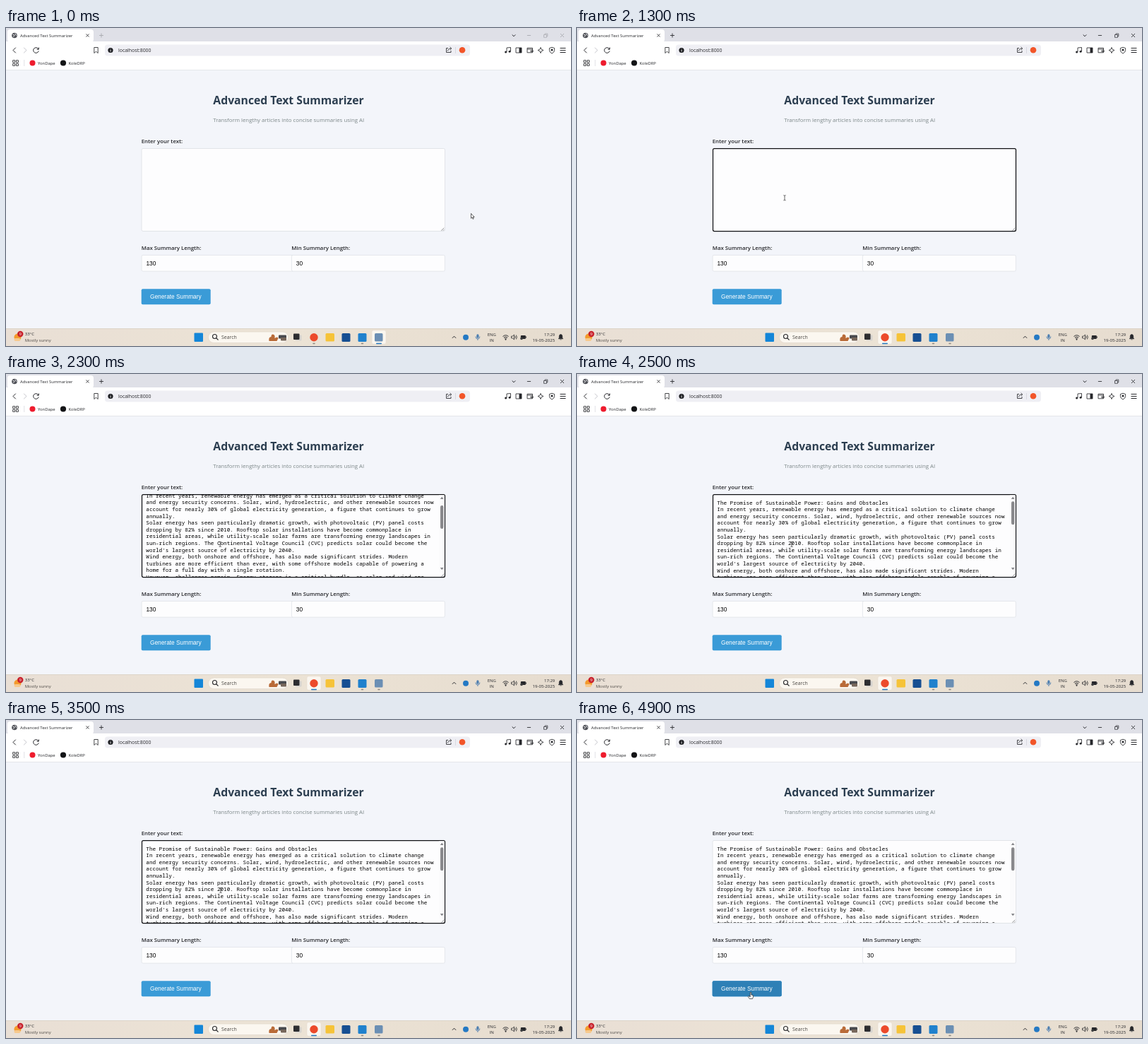
An HTML page with a canvas that plays this animation: 800 by 450 pixels, repeating every 5000 ms.

```html
<!DOCTYPE html>
<html lang="en">
<head>
<meta charset="utf-8">
<title>Advanced Text Summarizer</title>
<style>
html, body { margin: 0; width: 100%; height: 100%; overflow: hidden; }
canvas { display: block; width: 800px; height: 450px; }
</style>
</head>
<body>
<canvas id="stage"></canvas>
<script>
const LOOP = 5000, STEP = 100;
const FOCUS = 600, PASTE = 1500, SCROLL = [1900, 2400], CLICK = 4700;
const UI = '"Open Sans", "Noto Sans", sans-serif';
const ARIAL = '"Liberation Sans", sans-serif';
const MONO = '"Noto Sans Mono", "DejaVu Sans Mono", monospace';
const INK = '#26272b';

const article = `The Promise of Sustainable Power: Gains and Obstacles
In recent years, renewable energy has emerged as a critical solution to climate change
and energy security concerns. Solar, wind, hydroelectric, and other renewable sources now
account for nearly 30% of global electricity generation, a figure that continues to grow
annually.
Solar energy has seen particularly dramatic growth, with photovoltaic (PV) panel costs
dropping by 82% since 2010. Rooftop solar installations have become commonplace in
residential areas, while utility-scale solar farms are transforming energy landscapes in
sun-rich regions. The Continental Voltage Council (CVC) predicts solar could become the
world's largest source of electricity by 2040.
Wind energy, both onshore and offshore, has also made significant strides. Modern
turbines are more efficient than ever, with some offshore models capable of powering a
home for a full day with a single rotation.
However, challenges remain. Energy storage is a critical hurdle, as solar and wind are
intermittent sources. Battery technology is improving, but large-scale storage is still
expensive. Grid infrastructure also needs upgrades to handle distributed generation.
Supply chains for key minerals add further pressure on costs and delivery times.
Policy support plays a crucial role in the pace of this change.
Many governments offer incentives, but the playing field is uneven. Despite growing
subsidies for renewable energy, fossil fuels still receive significantly more in global
subsidies. The political will to maintain consistent renewable energy policies varies
greatly between nations.
Despite these challenges, experts remain optimistic. Technological advancements in areas
like perovskite solar cells, floating wind turbines, and green hydrogen production
continue to push the boundaries of what's possible. As costs decline further and
efficiencies improve, renewable energy appears poised to dominate the global energy mix
within the coming decades.
The transition to renewable energy isn't just about technology—it represents a
fundamental shift in how societies produce and consume energy. While the path forward has
obstacles, the environmental and economic benefits make this transition one of the most
important undertakings of the 21st century.`.split('\n');
const LINE = 9.583, BOTTOM = 186.7;

// time, x, y
const path = [
  [0, 658.5, 262.5], [100, 658.5, 262.5], [500, 294, 242], [1800, 294, 239.5],
  [2400, 304, 241], [3700, 304, 241], [4200, 240.5, 363.5], [4500, 246, 385.5], [LOOP, 246, 385.5]
];

const canvas = document.getElementById('stage');
const c = canvas.getContext('2d');
const dpr = window.devicePixelRatio || 1;
canvas.width = 800 * dpr;
canvas.height = 450 * dpr;

const smooth = (a, b, t) => {
  const k = Math.min(1, Math.max(0, (t - a) / (b - a)));
  return k * k * (3 - 2 * k);
};

function box(x, y, w, h, fill, r = 0, stroke, lw = 1) {
  c.beginPath();
  c.roundRect(x, y, w, h, r);
  if (fill) { c.fillStyle = fill; c.fill(); }
  if (stroke) { c.strokeStyle = stroke; c.lineWidth = lw; c.stroke(); }
}

function dot(x, y, r, fill) {
  c.beginPath();
  c.arc(x, y, r, 0, 7);
  c.fillStyle = fill;
  c.fill();
}

function text(s, x, y, size, color = INK, { family = UI, weight = 400, align = 'left' } = {}) {
  c.font = `${weight} ${size}px ${family}`;
  c.textAlign = align;
  c.fillStyle = color;
  c.fillText(s, x, y);
}

function icon(d, x, y, stroke = INK, fill, lw = 0.85) {
  const p = new Path2D(d);
  c.save();
  c.translate(x, y);
  if (fill) { c.fillStyle = fill; c.fill(p); }
  if (stroke) { c.strokeStyle = stroke; c.lineWidth = lw; c.stroke(p); }
  c.restore();
}

function browser(active) {
  const dim = active ? INK : '#a6a7ad';
  box(0, 0, 800, 19, '#dfe0e7');
  box(0, 19, 800, 40, '#fff');
  box(2, 2, 122, 18, '#fff', 4);
  dot(12, 10.5, 3.8, '#505259');
  icon('M-2.5-1.5L0-.5L-.5 1L-2 2M1-3L1.5-1L3 0', 12, 10.5, '#fff');
  text('Advanced Text Summarizer', 20, 12.6, 5.88);
  icon('M-2-2L2 2M2-2L-2 2', 115.5, 10.5);
  icon('M-3 0H3M0-3V3', 135, 10.5, dim);
  icon('M-2.3-1L0 1.3L2.3-1', 719, 10.5, INK, null, 1);
  icon('M-2.6 0H2.6', 740.5, 10.5, dim);
  icon('M-2.5-1H1.5V2.8H-2.5ZM-1-1V-2.5H2.8V1.3H1.5', 764, 10.5, dim, null, 0.7);
  icon('M-2.5-2.5L2.5 2.5M2.5-2.5L-2.5 2.5', 787.5, 10.5, dim);

  icon('M1.8-3.8L-2 0L1.8 3.8', 12, 31.5, INK, null, 1);
  icon('M-1.8-3.8L2 0L-1.8 3.8', 27, 31.5, '#b9bac0');
  icon('M3.5-1.5A3.8 3.8 0 1 0 3.7 1M3.8-4V-1.3H1.2', 42.5, 31.5, INK, null, 1);
  icon('M-2.7-4H2.7V4L0 1.7L-2.7 4Z', 127.5, 31.5);
  box(140, 23.5, 517, 16, '#efeff4', 4);
  dot(148, 31.5, 3.6, '#1d1e22');
  box(147.6, 31, 0.9, 2.4, '#fff');
  box(147.6, 29.4, 0.9, 0.9, '#fff');
  text('localhost:8000', 159, 33.9, 6.9);
  icon('M-1-2.5H-3.5V3.5H3V1M-1.5 1.5C-1.3-1 .5-2 3.5-2M1.6-4L3.7-2L1.6 0', 627, 31);
  box(636, 27, 0.7, 9, '#d0d0d7');
  dot(646, 31.3, 4.3, '#f25529');

  icon('M-2 2.3V-3.5L3.5-4V1.5', 711, 31.5);
  dot(707.6, 34, 1.5, INK);
  dot(713.1, 33.3, 1.5, INK);
  icon('M-4-3.5H4V3.5H-4Z', 726, 31.5);
  box(726.5, 28, 3.5, 7, INK);
  icon('M-4-3H3.5V3.5H-4ZM-4-1.3H3.5M1 .5H4.2V2.2H1Z', 742, 31.3);
  icon('M0-4L1.2-1.2L4 0L1.2 1.2L0 4L-1.2 1.2L-4 0L-1.2-1.2Z', 757, 31.5);
  icon('M0-4.2L3.6-3V0Q3.5 3 0 4.5Q-3.5 3-3.6 0V-3Z', 773, 31.5);
  dot(773, 31, 1.6, INK);
  icon('M-4-3H4M-4 0H4M-4 3H4', 788.5, 31.5, INK, null, 1);

  icon('M-3.8-3.8H-.8V-.8H-3.8ZM.9-3.8H3.9V-.8H.9ZM-3.8 .9H-.8V3.9H-3.8ZM.9 .9H3.9V3.9H.9Z', 13.5, 49.5);
  box(25.5, 45, 0.7, 9, '#d4d4da');
  dot(37.5, 49.5, 4, '#ee1c2e');
  text('YonDape', 45, 51.8, 5.88);
  dot(81, 49.5, 4.1, '#131416');
  text('KoleDRP', 88.5, 51.8, 5.88);
  box(0, 59, 800, 0.8, '#e3e4e9');
}

function articleBox(t) {
  const focused = t >= FOCUS && t < CLICK;
  if (focused) box(192.5, 170.5, 429, 117, '#fdfdfe', 2, '#101114', 1.25);
  else box(192, 170.5, 429.5, 117, '#fdfdfe', 2, '#dcdfe4', 0.8);

  if (t >= PASTE) {
    const scroll = BOTTOM * (1 - smooth(...SCROLL, t));
    c.save();
    c.beginPath();
    c.rect(193, 171, 428, 116);
    c.clip();
    article.forEach((s, i) => {
      const y = 184.7 + i * LINE - scroll;
      if (y > 165 && y < 298) text(s, 198.3, y, 7.64, '#000', { family: MONO, weight: 500 });
    });
    box(613, 171.4, 7.6, 110, '#fbfbfc');
    c.restore();
    icon('M-2.4 1.6L0-1.8L2.4 1.6Z', 617.2, 175.5, null, '#85868a');
    icon('M-2.4-1.6L0 1.8L2.4-1.6Z', 617.2, 275.5, null, '#85868a');
    box(615, 180.3 + scroll * 0.295, 4.4, 33, '#89898c', 2.2);
  } else if (focused && (t - FOCUS) % 1000 < 500) {
    box(198, 177.2, 0.8, 9.6, '#222');
  }
  icon('M-4 0L0-4M-1.6 0L0-1.6', 620.3, 286.8, '#66686d', null, 0.7);
}

function page(t) {
  box(0, 59.8, 800, 366, '#f3f5fa');
  text('Advanced Text Summarizer', 400, 107.9, 15.72, '#2c3e50', { weight: 700, align: 'center' });
  text('Transform lengthy articles into concise summaries using AI', 400.2, 132.9, 7.83, '#7c8788', { align: 'center' });
  const label = (s, x, y) => text(s, x, y, 7.82, INK, { weight: 600 });
  label('Enter your text:', 191.7, 162.9);
  articleBox(t);
  label('Max Summary Length:', 191.7, 313.8);
  label('Min Summary Length:', 404.3, 313.8);
  const field = (s, x, w) => {
    box(x, 321.4, w, 22.8, '#fdfdfe', 2, '#dfe2e7', 0.8);
    text(s, x + 6.4, 335.6, 8.33, '#000', { family: ARIAL });
  };
  field('130', 192, 216);
  field('30', 404.4, 217);
  const button = color => box(191.7, 369.2, 98, 22, color, 2);
  button('#3a9bd7');
  c.globalAlpha = smooth(4250, 4600, t);
  button('#2e80b6');
  c.globalAlpha = 1;
  text('Generate Summary', 204, 383, 8.33, '#fff', { family: ARIAL });
}

function taskbar(active) {
  const g = c.createLinearGradient(0, 0, 800, 0);
  g.addColorStop(0, '#e9dfd5');
  g.addColorStop(0.5, '#ece3d5');
  g.addColorStop(1, '#e6dccf');
  box(0, 425, 800, 25, g);
  box(0, 425, 800, 0.7, '#d9d0c5');

  dot(16.5, 437.5, 5, '#f39a2d');
  box(11.5, 439, 9, 4, '#f7c98c', 2);
  dot(20.3, 433, 4.2, '#c8202b');
  text('9', 20.3, 435, 5.5, '#fff', { align: 'center' });
  text('33°C', 26.7, 435.3, 6);
  text('Mostly sunny', 26.7, 444, 6, '#4c4945');

  box(266.5, 431.5, 12.5, 12.5, '#1486d8', 1);
  box(286.5, 430, 113, 15.5, '#fbf7f0', 7.7, '#ddd4c8', 0.6);
  icon('M2-1A3 3 0 1 1-4-1A3 3 0 1 1 2-1M1.2 1.2L4 4', 296.5, 437.5, INK, null, 1.1);
  text('Search', 305, 440, 6.95, '#4c4945');
  icon('M-7 5Q-8-1-4-1Q-4-6 0-4Q2-2 1 1Q5-2 6 1L4 5Z', 379.5, 438, null, '#b96b38');
  box(386, 434.5, 11, 5, '#48494d', 1);
  box(389, 438, 8, 4.5, '#76665a', 1);

  const slot = active ? 436 : 528;
  box(slot - 10, 427.8, 20, 19.4, '#faf6ef', 2.5, '#e4dbcf', 0.5);
  box(409.5, 434.5, 9, 8, '#d6d3cf', 1);
  box(407, 432.5, 8.5, 8.5, '#2d2d30', 1);
  dot(436, 437.7, 5.7, '#ec4a2b');
  box(452.5, 432, 12.5, 11.5, '#f6c338', 1.5);
  box(475.5, 432, 12, 12, '#174f92', 1.5);
  box(498.5, 432, 12, 12, '#2081cd', 1.5);
  box(522, 432, 11.5, 11.5, '#6b8fb4', 1.5);
  for (const x of [436, 504.5, 528]) {
    const on = x === slot, w = on ? 8 : 3.5;
    box(x - w / 2, 445.8, w, 1.5, on ? '#2175bd' : '#8d8780', 0.7);
  }

  icon('M-2.6 1.3L0-1.3L2.6 1.3', 634.5, 437.5, INK, null, 1);
  dot(651, 437.7, 4, '#2479c4');
  box(666.3, 433.3, 3.2, 5.5, '#4d7eb0', 1.6);
  icon('M-3-.5Q-3 3 0 3Q3 3 3-.5M0 3V5', 667.9, 437, '#4d7eb0');
  text('ENG', 687.8, 435.7, 6, INK, { align: 'center' });
  text('IN', 687.8, 444, 6, INK, { align: 'center' });
  icon('M-4-1.5Q0-5 4-1.5M-2.6 .2Q0-2 2.6 .2M-1.3 1.8Q0 .7 1.3 1.8', 707.5, 438, INK, null, 1);
  dot(707.5, 440.8, 0.9, INK);
  icon('M-4-1.3H-2.4L0-3.4V3.4L-2.4 1.3H-4Z', 719.5, 437.5, INK, null, 0.8);
  icon('M1.5-1.5Q2.5 0 1.5 1.5M2.8-3Q5 0 2.8 3', 719.5, 437.5, INK, null, 0.8);
  box(728.8, 435, 7, 5, INK, 1);
  box(735.8, 436.5, 1, 2, INK);
  dot(730, 439.5, 1.8, '#3c3d3f');
  text('17:29', 777.3, 435.5, 6, INK, { align: 'right' });
  text('19-05-2025', 777.3, 444, 6.1, INK, { align: 'right' });
  icon('M-3.2 2.3L-2.2 .8V-1.5Q-2-4 0-4Q2-4 2.2-1.5V.8L3.2 2.3ZM-1 3.4H1', 785.5, 437.5, INK, INK, 0.7);
}

function pointerAt(t) {
  const i = path.findIndex((p, n) => n && t <= p[0]);
  const [a, b] = [path[i - 1], path[i]];
  const k = smooth(a[0], b[0], t);
  return [a[1] + (b[1] - a[1]) * k, a[2] + (b[2] - a[2]) * k];
}

function pointer(t) {
  const [x, y] = pointerAt(t);
  const inside = (l, top, r, b) => x > l && x < r && y > top && y < b;
  if (inside(192, 171, 613, 288)) {
    icon('M-1.6-3.6Q0-3.6 0-2.8Q0-3.6 1.6-3.6M0-2.8V2.8M-1.6 3.6Q0 3.6 0 2.8Q0 3.6 1.6 3.6', x, y, '#222', null, 0.7);
  } else if (inside(192, 369, 290, 391)) {
    icon('M-.8 0Q0-.8 .8 0V3.4L3.4 4.1V6.8L2.5 9H-1.7L-3.7 6Q-3.5 4.8-2.2 5.4L-.8 6.3Z', x, y, '#222', '#fff', 0.7);
  } else {
    icon('M0 0V6.8L1.5 5.4L2.6 7.9L3.7 7.4L2.6 5H4.7Z', x, y, '#222', '#fff', 0.7);
  }
}

function draw(now) {
  const t = Math.floor((now % LOOP) / STEP) * STEP;
  const active = t >= FOCUS;
  c.setTransform(dpr, 0, 0, dpr, 0, 0);
  page(t);
  browser(active);
  taskbar(active);
  pointer(t);
}

let start;
function tick(now) {
  start ??= now;
  draw(Math.max(0, now - start));
  requestAnimationFrame(tick);
}
draw(0);
requestAnimationFrame(tick);
</script>
</body>
</html>
```
